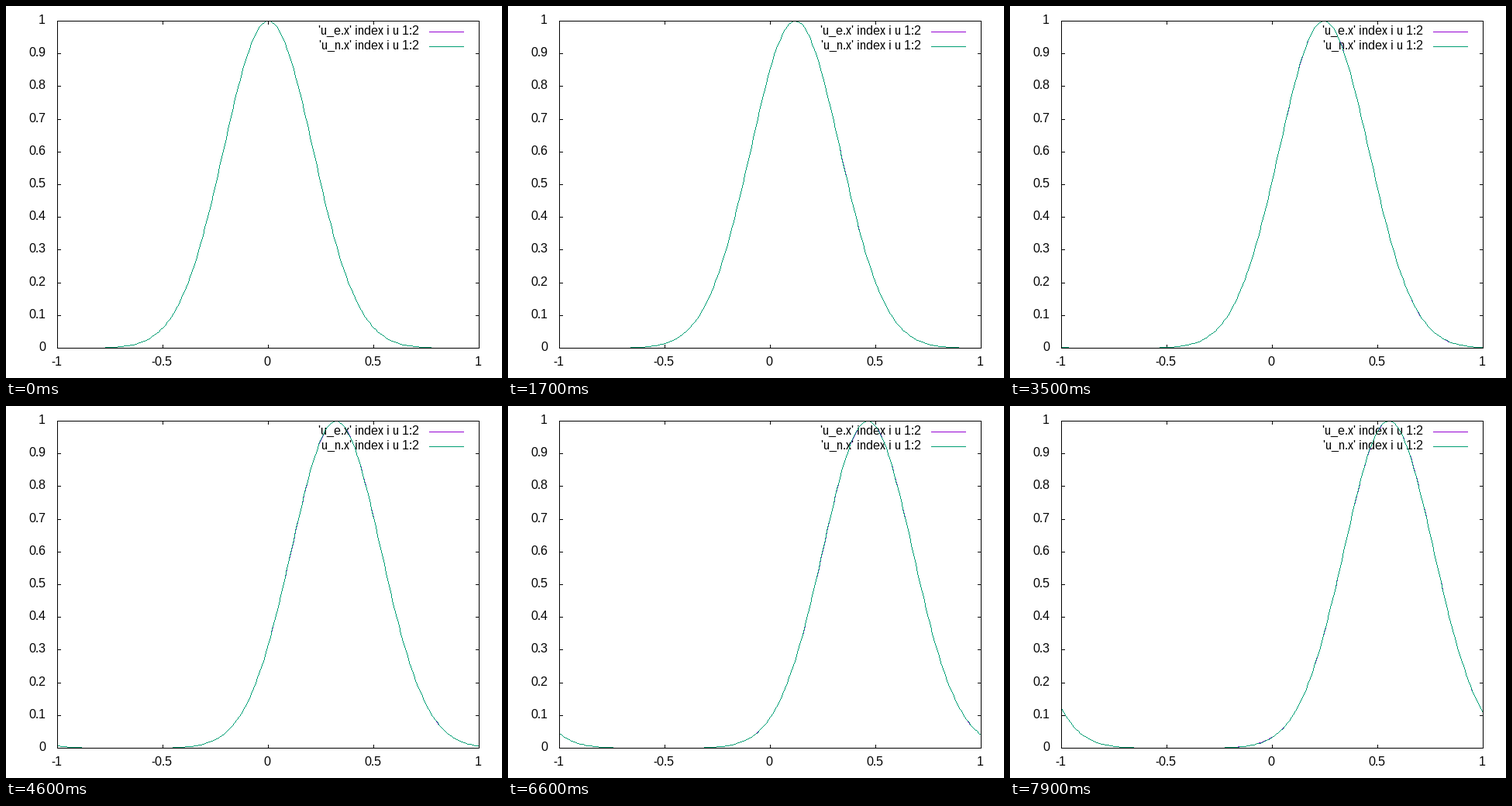
A matplotlib script that plays this animation: 640 px wide and 480 px high, repeating every 8000 ms.

```python
import numpy as np
import matplotlib
import matplotlib.pyplot as plt
from matplotlib.animation import FuncAnimation

W, H, DPI = 640, 480, 100
FRAMES, INTERVAL = 80, 100
LEFT, RIGHT, TOP, BOTTOM = 65, 609, 19, 441
PURPLE, GREEN = "#9400d3", "#009e73"
DX, CFL = 0.01, 0.7
PERIOD = 2 - DX  # one ghost point at each end of the grid

matplotlib.rcParams.update({
    "font.family": "Liberation Sans",
    "font.size": 16 * 72 / DPI,
    "text.hinting": "default",
    "text.hinting_factor": 1,
})

x = np.linspace(-1, 1, 201)


def exact(n):
    d = (x - CFL * DX * n + PERIOD / 2) % PERIOD - PERIOD / 2
    return 2.0 ** (-16 * d**2)


def lax_wendroff(u):
    new = u.copy()
    a, b, c = u[:-2], u[1:-1], u[2:]
    new[1:-1] = b - CFL / 2 * (c - a) + CFL**2 / 2 * (c - 2 * b + a)
    new[0], new[-1] = new[-2], new[1]
    return new


numeric = [exact(0)]
for _ in range(FRAMES - 1):
    numeric.append(lax_wendroff(numeric[-1]))


def to_px(v):
    return LEFT + (v + 1) / 2 * (RIGHT - LEFT)


def to_py(v):
    return BOTTOM - v * (BOTTOM - TOP)


def snap(v):
    return np.floor(np.asarray(v, float) + 0.5)


def trace(xs, ys):
    """Centres of the pixels on a one-pixel polyline without smoothing."""
    xs, ys = snap(xs), snap(ys)
    steps = np.maximum(abs(np.diff(xs)), abs(np.diff(ys)))
    at = np.concatenate([[0], np.cumsum(steps)])
    t = np.arange(at[-1] + 1)
    return snap(np.interp(t, at, xs)) + 0.5, snap(np.interp(t, at, ys)) + 0.5


fig = plt.figure(figsize=(W / DPI, H / DPI), dpi=DPI, facecolor="white")
ax = fig.add_axes([0, 0, 1, 1])
ax.set_xlim(0, W)
ax.set_ylim(H, 0)
ax.axis("off")


def line(xs, ys, color="black", z=2):
    return ax.plot(*trace(xs, ys), ",", color=color, zorder=z)[0]


def label(px, base, s, ha):
    ax.text(px, base, s, ha=ha, va="baseline", zorder=1)


# Border and mirrored inward ticks
line([LEFT, RIGHT, RIGHT, LEFT, LEFT], [TOP, TOP, BOTTOM, BOTTOM, TOP], z=5)
for v in np.linspace(-1, 1, 5):
    px = to_px(v)
    line([px, px], [BOTTOM, BOTTOM - 4], z=1)
    line([px, px], [TOP, TOP + 4], z=1)
    label(px, 464, f"{v:g}", "center")
for v in np.linspace(0, 1, 11):
    py = to_py(v)
    line([LEFT, LEFT + 4], [py, py], z=1)
    line([RIGHT, RIGHT - 4], [py, py], z=1)
    label(51, snap(py) + 4, f"{v:g}", "right")

# Key
for py, name, color in ((33, "u_e.x", PURPLE), (52, "u_n.x", GREEN)):
    label(533, py + 4, f"'{name}' index i u 1:2", "right")
    line([545, 589], [py, py], color)

curve_e = line(to_px(x), to_py(exact(0)), PURPLE, 3)
curve_n = line(to_px(x), to_py(numeric[0]), GREEN, 4)


def update(n):
    curve_e.set_data(*trace(to_px(x), to_py(exact(n))))
    curve_n.set_data(*trace(to_px(x), to_py(numeric[n])))
    return curve_e, curve_n


anim = FuncAnimation(fig, update, frames=FRAMES, interval=INTERVAL,
                     init_func=lambda: update(0), repeat=True, repeat_delay=0)
plt.show()
```
